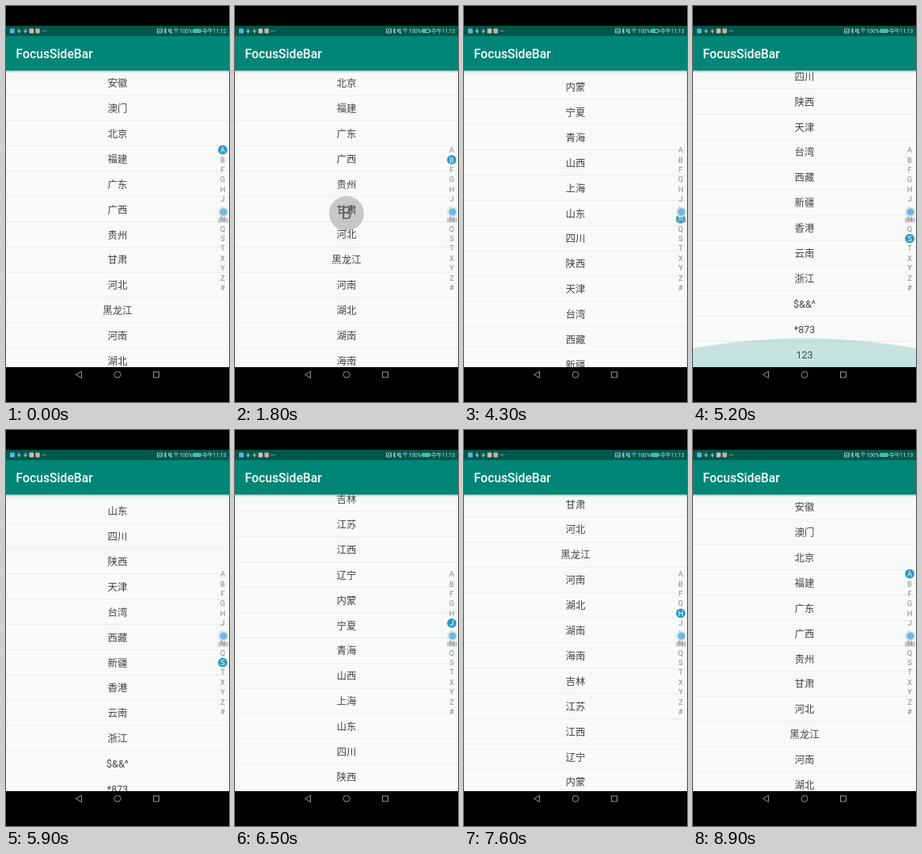
Write an HTML page that moves like this. It is 282 by 500 pixels and loops after 9200 ms.

```html
<!DOCTYPE html>
<html lang="zh-CN">
<head>
<meta charset="utf-8">
<title>FocusSideBar</title>
<style>
  html, body { margin: 0; width: 100%; height: 100%; overflow: hidden; background: #000; }
  svg { display: block; width: 100vw; height: 100vh; }
  text { font-family: Roboto, "Noto Sans CJK SC", "Noto Sans CJK", sans-serif; }
  .title { font-size: 15.7px; font-weight: 500; fill: #fff; }
  .status { font-size: 6.7px; fill: #d5e4e1; }
  .row { font-size: 12.5px; fill: #424443; text-anchor: middle; }
  .letter { font-size: 9.4px; fill: #858888; text-anchor: middle; }
  .letter.on { fill: #fff; }
  .bubble { font-size: 22px; fill: #626464; text-anchor: middle; }
  .line { fill: none; stroke: #cfdedb; stroke-width: .8; }
  .nav { fill: none; stroke: #bdbdbd; stroke-width: .8; }
</style>
</head>
<body>
<svg viewBox="0 0 282 500" preserveAspectRatio="none">
  <defs>
    <clipPath id="view"><rect y="81" width="282" height="375"/></clipPath>
    <linearGradient id="shade" x2="0" y2="1">
      <stop stop-color="#000" stop-opacity=".24"/>
      <stop offset="1" stop-color="#000" stop-opacity="0"/>
    </linearGradient>
  </defs>

  <rect y="81" width="282" height="375" fill="#f8faf8"/>
  <g clip-path="url(#view)">
    <g id="list"></g>
    <path id="glow" fill="#008577"/>
    <rect y="81" width="282" height="4" fill="url(#shade)"/>
  </g>

  <circle id="focus" cx="274" r="5.9" fill="#239bc4"/>
  <g id="bar"></g>

  <g id="bubble">
    <circle cx="141" cy="262" r="22" fill="#000" fill-opacity=".2"/>
    <text id="hint" class="bubble" x="141" y="269"></text>
  </g>

  <!-- floating assistant -->
  <rect x="268" y="267.5" width="13" height="6" rx="1" fill="#8d9292" fill-opacity=".45"/>
  <circle cx="274.5" cy="260" r="6.8" fill="#d5e5eb" fill-opacity=".85"/>
  <circle cx="275" cy="260" r="4.5" fill="#6fb9de"/>

  <rect y="38" width="282" height="43.5" fill="#008577"/>
  <text class="title" x="12.6" y="66">FocusSideBar</text>

  <!-- status bar -->
  <rect y="25" width="282" height="13" fill="#00574b"/>
  <rect x="5" y="28.5" width="6" height="6" rx="1" fill="#58b5df"/>
  <g class="line">
    <path id="usb" d="M16.5 28.5v6M14.8 30.5v1.4l1.7 1.2 1.7-1.2v-1.4"/>
    <use href="#usb" x="8"/>
    <path d="M191.5 29h6v5h-6zM192 33.5l2-2.5 1.5 1.5 1.5-2"/>
    <path d="M199.8 30l3 3-1.5 1.5v-6l1.5 1.5-3 3"/>
    <path d="M205.5 30.5h1.5l2-1.6v5.4l-2-1.6h-1.5zM205.5 28.5l5 6"/>
    <path d="M212 30.2q3-2.8 6 0M213.3 31.8q1.7-1.6 3.4 0M215 33.2v1"/>
    <path d="M237 29.4h9v4h-9zM235.8 31.4h1.2M246 31.4h2"/>
  </g>
  <rect x="29.5" y="28.5" width="5.5" height="6" rx="1" fill="#d5b9b3"/>
  <rect x="37.3" y="28.5" width="5.5" height="6" rx="1" fill="#d5a9a2"/>
  <g fill="#d5e4e1">
    <circle cx="46.3" cy="31.5" r=".6"/><circle cx="48.3" cy="31.5" r=".6"/><circle cx="50.3" cy="31.5" r=".6"/>
  </g>
  <text class="status" x="219.4" y="33.9">100%</text>
  <rect id="charge" x="237" y="29.4" height="4" fill="#35c49c"/>
  <text class="status" id="clock" x="278.3" y="33.9" text-anchor="end"></text>

  <g class="nav">
    <path d="M95.5 461.3v8.4l-7-4.2z"/>
    <circle cx="141" cy="465.5" r="4"/>
    <rect x="186.5" y="462" width="7" height="7"/>
  </g>
</svg>

<script>
const LOOP = 9200, STEP = 100, ROW = 31.9, TOP = 81.55, BOTTOM = 456;
const groups = {
  A: '安徽 澳门', B: '北京', F: '福建', G: '广东 广西 贵州 甘肃',
  H: '河北 黑龙江 河南 湖北 湖南 海南', J: '吉林 江苏 江西', L: '辽宁',
  N: '内蒙 宁夏', Q: '青海', S: '山西 上海 山东 四川 陕西',
  T: '天津 台湾', X: '西藏 新疆 香港', Y: '云南', Z: '浙江', '#': '$&&^ *873 123'
};
const letters = Object.keys(groups);
const rows = letters.flatMap(letter => groups[letter].split(' ').map(name => ({ letter, name })));
const maxScroll = rows.length * ROW - (BOTTOM - TOP);

const $ = id => document.getElementById(id);
function add(parent, tag, attrs, text = '') {
  const node = document.createElementNS('http://www.w3.org/2000/svg', tag);
  for (const key in attrs) node.setAttribute(key, attrs[key]);
  node.textContent = text;
  return parent.appendChild(node);
}

rows.forEach(({ name }, i) => {
  const y = TOP + i * ROW;
  add($('list'), 'text', { class: 'row', x: 141, y: y + ROW / 2 + 4.6 }, name);
  add($('list'), 'rect', { y: y + ROW - 1, width: 282, height: .8, fill: '#e5e9e7' });
});

const letterY = i => 181.7 + i * 12.43;
const labels = letters.map((letter, i) =>
  add($('bar'), 'text', { class: 'letter', x: 274, y: letterY(i) + 3.4 }, letter));

// Touching the bar jumps to a section; afterwards the list is dragged.
const jumps = [[0, 'A'], [1800, 'B'], [2400, 'F'], [3100, 'G'], [3400, 'H'], [3700, 'J']];
const drag = [[3800, 446.6], [4300, 569.2], [5000, maxScroll], [5800, maxScroll],
  [6500, 456.6], [7600, 226.8], [8200, 0], [LOOP, 0]];

function scrollAt(t) {
  if (t < drag[0][0]) {
    const letter = jumps.findLast(jump => jump[0] <= t)[1];
    return rows.findIndex(row => row.letter === letter) * ROW;
  }
  const i = drag.findIndex(point => point[0] > t);
  const [t0, s0] = drag[i - 1], [t1, s1] = drag[i];
  return s0 + (s1 - s0) * (t - t0) / (t1 - t0);
}

function drawGlow(t) {
  const pull = t < 5200 ? (t - 4900) / 300 : (5700 - t) / 500;
  const height = 36.5 * Math.max(0, pull);
  const side = BOTTOM - height * .65;
  $('glow').setAttribute('d', `M0 ${BOTTOM}V${side}Q141 ${side - height * .7} 282 ${side}V${BOTTOM}Z`);
  $('glow').setAttribute('fill-opacity', .2 * Math.max(0, pull));
}

function draw(now) {
  const t = Math.floor(now % LOOP / STEP) * STEP;
  const scroll = scrollAt(t);
  // The first fully visible row decides which letter is focused.
  const { letter } = rows[Math.ceil(scroll / ROW - .01)];
  const index = letters.indexOf(letter);

  $('list').setAttribute('transform', `translate(0 ${-scroll})`);
  $('focus').setAttribute('cy', letterY(index));
  labels.forEach((label, i) => label.classList.toggle('on', i === index));
  $('hint').textContent = letter;
  $('bubble').style.display = t >= 1200 && t < 3900 ? '' : 'none';
  $('clock').textContent = t < 200 ? '中午11:12' : '中午11:13';
  $('charge').setAttribute('width', t >= 1800 && t < 4800 ? 5 : 9);
  drawGlow(t);
}

const start = performance.now();
function tick() {
  draw(performance.now() - start);
  requestAnimationFrame(tick);
}
tick();
</script>
</body>
</html>
```
